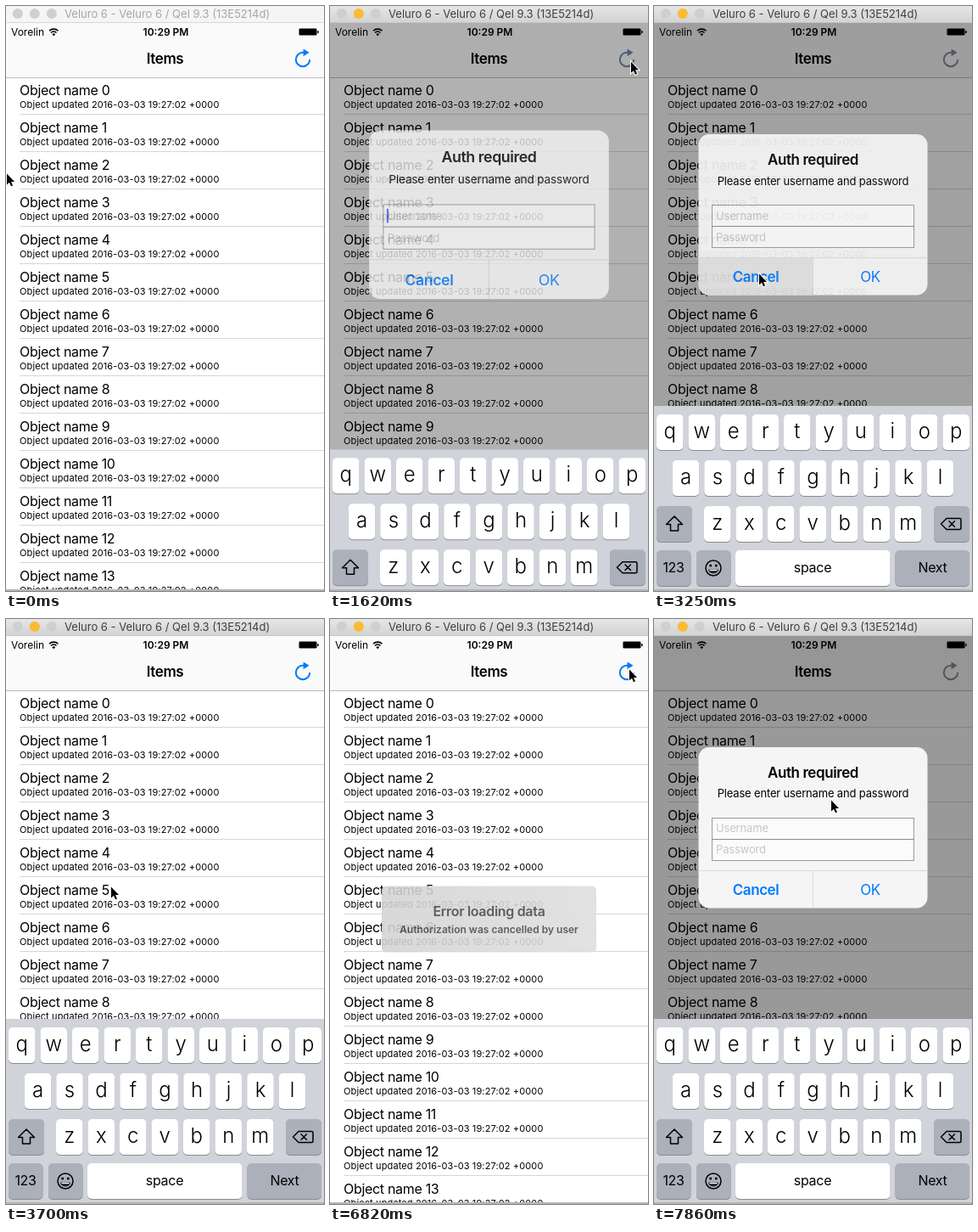
An HTML page for the animation above (8 s loop, 375x689 px).

```html
<!DOCTYPE html>
<html lang="en">
<head>
<meta charset="utf-8">
<title>Auth alert</title>
<style>
html, body { margin: 0; width: 100%; height: 100%; overflow: hidden; background: #fff; }
svg { display: block; width: 375px; height: 689px; font-family: Inter, Roboto, "Liberation Sans", sans-serif; }
text { white-space: pre; }
.mid { text-anchor: middle; }
.s11 { font-size: 11px; letter-spacing: .12px; }
.s12 { font-size: 12px; }
.s13 { font-size: 13px; letter-spacing: -.17px; }
.s16 { font-size: 16px; letter-spacing: -.31px; }
.s17 { font-size: 17px; letter-spacing: -.41px; }
.key { font-size: 24px; font-weight: 300; }
.bold { font-weight: 600; }
.blue { fill: #007aff; }
.hint { fill: #c7c7cc; }
.line { fill: none; stroke: #000; stroke-width: 1.5; stroke-linejoin: round; stroke-linecap: round; }
</style>
</head>
<body>
<svg id="stage" viewBox="0 0 375 689"></svg>
<script>
const LOOP = 8000, STEP = 148;
const ALERTS = [{ open: 1476, close: 3230, keysDown: 4200 }, { open: 7157, close: 1e5, keysDown: 1e5 }];
const TOAST = { show: 4240, hide: 6780 };
const ACTIVATE = 1330;
const POINTER = [
  [260, 0, 196], [1036, 354, 65], [1950, 354, 64], [2368, 262, 118], [2960, 123, 314],
  [4960, 123, 314], [5328, 122, 300], [6068, 339, 61], [6216, 344, 60], [6364, 352, 58],
  [7420, 352, 58], [7844, 208, 212]
];

const range = n => [...Array(n).keys()];
const clamp = v => Math.max(0, Math.min(1, v));
const ramp = (t, start, length) => clamp((t - start) / length);
const mix = (a, b, k) => a + (b - a) * k;

// Critically damped spring from 0 to 1.
const spring = ms => {
  const x = Math.max(0, ms) * .01826;
  return 1 - (1 + x) * Math.exp(-x);
};

const rect = (x, y, w, h, fill, extra = '') =>
  `<rect x="${x}" y="${y}" width="${w}" height="${h}" fill="${fill}" ${extra}/>`;
const text = (x, y, cls, str, extra = '') =>
  `<text x="${x}" y="${y}" class="${cls}" ${extra}>${str}</text>`;
const path = (d, extra = 'class="line"') => `<path d="${d}" ${extra}/>`;

function titleBar() {
  const light = (x, fill, id = '') => `<circle cx="${x}" cy="9" r="6" fill="${fill}" ${id}/>`;
  return rect(0, 0, 375, 20, '#f5f5f5', 'id="bar"') +
    [13.8, 33.8, 53.8].map(x => light(x, '#cfcfcf')).join('') +
    light(33.8, '#fcbb2f', 'id="minimise"') +
    text(69, 14, '', 'Veluro 6 - Veluro 6 / Qel 9.3 (13E5214d)', 'id="caption" font-size="13"') +
    rect(0, 19.5, 375, .5, '#b8b8b8');
}

function navBar() {
  return rect(0, 20, 375, 64, '#fafafa') + rect(0, 84, 375, 1, '#bcbcbe') +
    text(6, 34.5, 's12', 'Vorelin') +
    path('M51 29.3a7.5 7.5 0 0 1 10.5 0M53 31.5a4.6 4.6 0 0 1 6.5 0', 'fill="none" stroke="#000" stroke-width="1.6"') +
    path('M56.25 35.2l-1.9-2a2.7 2.7 0 0 1 3.8 0z', '') +
    text(188.5, 34.5, 's12 bold mid', '10:29 PM') +
    rect(345.5, 26.5, 21, 8, '#000', 'rx="1.3"') + rect(367.2, 29, 1.5, 3.2, '#000', 'rx=".7"') +
    text(187.5, 68, 's17 bold mid', 'Items') +
    `<g id="refresh">${path('M358.2 63a8.2 8.2 0 1 1-8.2-8.2h2', 'fill="none" stroke="currentColor" stroke-width="2"')}
     ${path('M350.6 50.4l7 4.4-7 4.4z', 'fill="currentColor"')}</g>`;
}

function list() {
  return range(14).map(i => {
    const y = 84 + 44 * i;
    return text(16, y + 21, 's16', 'Object name ' + i) +
      text(16, y + 36, 's11', 'Object updated 2016-03-03 19:27:02 +0000') +
      rect(16, y + 43, 359, 1, '#d6d5da');
  }).join('');
}

function spinner() {
  return '<g id="spinner" transform="translate(186 353)">' + range(12).map(i =>
    rect(-1.5, -18, 3, 10, '#777', `rx="1.5" opacity="${.35 + i * .055}" transform="rotate(${i * 30})"`)).join('') + '</g>';
}

function toast() {
  return '<g id="toast">' + rect(61, 314.5, 253, 78, 'url(#frost)', 'rx="5"') +
    text(187.5, 349.5, 's16 bold mid', 'Error loading data', 'fill="#4a4a4a"') +
    text(187.5, 369.5, 's12 bold mid', 'Authorization was cancelled by user', 'fill="#4a4a4a"') + '</g>';
}

function alertBox() {
  return '<g id="alert">' + rect(52.5, 151, 270, 189.5, '#f5f5f5', 'rx="12.5"') +
    path('M52.5 296.5h135v44h-122.5a12.5 12.5 0 0 1-12.5-12.5z', 'id="pressed" fill="#e2e2e2"') +
    text(187.5, 187, 's17 bold mid', 'Auth required') +
    text(187.5, 210.5, 's13 mid', 'Please enter username and password') +
    rect(68.5, 234.5, 238, 50, '#fbfbfb', 'stroke="#9a9a9a"') + rect(68, 259, 239, 1, '#8c8c8c') +
    text(73, 251.5, 's13 hint', 'Username') + text(73, 276.5, 's13 hint', 'Password') +
    rect(72.3, 239, 2, 16, '#426bf2', 'id="caret"') +
    rect(52.5, 296, 270, 1, '#dadade') + rect(187, 296, 1, 44.5, '#dadade') +
    text(120, 325, 's17 bold blue mid', 'Cancel') + text(255, 325, 's17 blue mid', 'OK') + '</g>';
}

function keyboard() {
  const cap = (x, y, w, dark) => rect(x, y + 1, w, 42, '#888b91', 'rx="5"') +
    rect(x, y, w, 42, dark ? '#abb0ba' : '#fff', 'rx="5"');
  const row = (letters, x, y) => [...letters].map((c, i) =>
    cap(x + 37.5 * i, y, 31.5) + text(x + 15.75 + 37.5 * i, y + 28, 'key mid', c)).join('');
  const label = (x, str) => text(x, 667, 's16 mid', str);
  return '<g id="keyboard">' + rect(0, 471, 375, 218, '#d0d3d9') +
    row('qwertyuiop', 3, 481) + row('asdfghjkl', 21.75, 535) + row('zxcvbnm', 59, 589) +
    cap(3, 589, 42, true) + path('M24 601l-9.5 9.5h5v7.5h9v-7.5h5z') +
    cap(330, 589, 42, true) +
    path('M345 603.5h15.5q1.5 0 1.5 1.5v10q0 1.5-1.5 1.5H345l-6.5-6.5zM348 606.8l6.5 6.5m0-6.5l-6.5 6.5') +
    cap(3, 641, 40.5, true) + label(23, '123') +
    cap(50, 641, 40.5, true) +
    '<circle cx="70" cy="662" r="9" class="line"/><circle cx="66.7" cy="659" r="1.5"/><circle cx="73.3" cy="659" r="1.5"/>' +
    path('M64 663.5h12a6 5 0 0 1-12 0z', 'fill="#222"') + path('M65.5 664.5h9', 'stroke="#fff" stroke-width="1.3"') +
    cap(96, 641, 182.5) + label(187, 'space') +
    cap(284.5, 641, 87.5, true) + label(328.5, 'Next') + '</g>';
}

const stage = document.getElementById('stage');
stage.innerHTML = `<defs>
  <linearGradient id="active" x2="0" y2="1"><stop stop-color="#e6e6e6"/><stop offset="1" stop-color="#d2d2d2"/></linearGradient>
  <linearGradient id="frost"><stop stop-color="#d4d4d4"/><stop offset="1" stop-color="#dfdfdf"/></linearGradient>
  </defs>` + rect(0, 0, 375, 689, '#fff') + list() + navBar() + spinner() + toast() +
  rect(0, 20, 375, 669, '#000', 'id="dim"') + alertBox() + keyboard() + titleBar() +
  rect(0, 687, 375, 2, '#b4b4b6') +
  '<g id="pointer">' + path('M1 1.5V14.5L4 11.8L6 16.3L8 15.4L6.1 11H10Z',
    'stroke="#fff" stroke-width="2" paint-order="stroke"') + '</g>';

const ui = Object.fromEntries([...stage.querySelectorAll('[id]')].map(el => [el.id, el]));
const set = (name, attrs) => {
  for (const key in attrs) ui[name].setAttribute(key, attrs[key]);
};

function pointerAt(t) {
  const next = POINTER.findIndex(p => p[0] > t);
  if (next === 0) return POINTER[0].slice(1);
  if (next < 0) return POINTER.at(-1).slice(1);
  const a = POINTER[next - 1], b = POINTER[next];
  const k = (t - a[0]) / (b[0] - a[0]);
  return [mix(a[1], b[1], k), mix(a[2], b[2], k)];
}

function draw(t) {
  const { open, close, keysDown } = t < 6500 ? ALERTS[0] : ALERTS[1];
  const entered = spring(t - open);
  const shown = entered * (1 - spring(t - close));
  const raised = entered * (1 - spring(t - keysDown));
  const scale = mix(1.2, 1, entered);
  const active = t >= ACTIVATE - 10;

  set('bar', { fill: active ? 'url(#active)' : '#f5f5f5' });
  set('caption', { fill: active ? '#3f3f3f' : '#a6a6a6' });
  set('minimise', { opacity: active ? 1 : 0 });

  const tint = [0, 122, 255].map(c => Math.round(mix(c, 142, shown)));
  set('refresh', { color: `rgb(${tint})` });
  set('dim', { opacity: .4 * shown });
  set('alert', {
    opacity: shown,
    transform: `translate(187.5 245.75) scale(${scale}) translate(-187.5 -245.75)`
  });
  set('caret', { opacity: (t - open + 1000) % 1000 < 550 ? 1 : 0 });
  set('pressed', { opacity: t >= close - 130 && t < close + 100 ? 1 : 0 });
  set('keyboard', { transform: `translate(0 ${218 * (1 - raised)})` });
  set('spinner', { opacity: .8 * ramp(t, open - 260, 150) * (1 - ramp(t, open, 130)) });
  set('toast', { opacity: ramp(t, TOAST.show, 400) * (1 - ramp(t, TOAST.hide, 250)) });
  set('pointer', { transform: `translate(${pointerAt(t)})` });
}

const began = performance.now();
function tick() {
  const t = (performance.now() - began) % LOOP;
  draw(Math.floor((t + 10) / STEP) * STEP % LOOP);
  requestAnimationFrame(tick);
}
tick();
</script>
</body>
</html>
```
